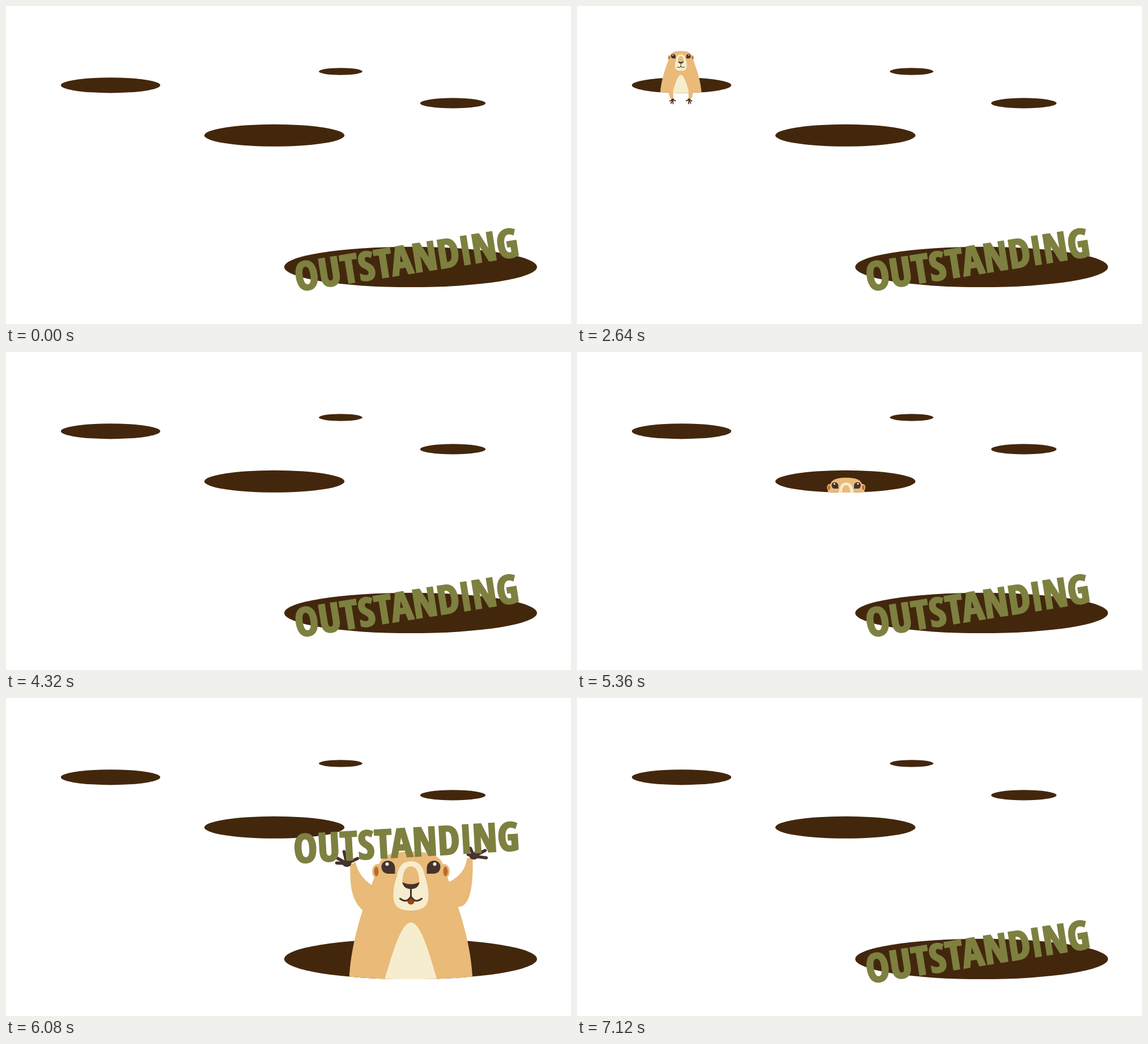
An HTML page with a canvas that plays this animation: 997x561 px, repeating every 7200 ms.

```html
<!DOCTYPE html>
<html lang="en">
<head>
<meta charset="utf-8">
<title>Outstanding</title>
<style>
  html, body { margin: 0; width: 100%; height: 100%; overflow: hidden; background: #fff; }
  canvas { display: block; }
</style>
</head>
<body>
<canvas id="stage" width="997" height="561"></canvas>
<script>
const ctx = document.getElementById('stage').getContext('2d');
const LOOP = 7200, STEP = 80, DEPTH = 225;
const SOIL = '#43270d', FUR = '#e9ba78', CREAM = '#f6edcf', DARK = '#46332e',
      EAR = '#bd6a2f', TONGUE = '#a5440f', OLIVE = '#7e8040';

// hole: cx, cy, rx, ry; up and down: start and end in ms
const gophers = [
  { hole: [590.5, 115.5, 38.5, 6.2], x: 590, top: 79, scale: .192, up: [40, 560], down: [1050, 1350], ease: 2 },
  { hole: [184.5, 139.8, 87.7, 13.6], x: 183.3, top: 79, scale: .335, up: [1640, 2160], down: [2638, 2938], ease: 2 },
  { hole: [788.5, 171.4, 57.6, 9.1], x: 788.5, top: 132, scale: .225, up: [3300, 3520], down: [3990, 4300], ease: 1 },
  { hole: [473.6, 228.3, 123.6, 19.5], x: 475, top: 138, scale: .494, up: [4660, 4880], down: [5115, 5440], ease: 1 },
  { hole: [714, 460.4, 223, 35.7], x: 714.5, top: 271, scale: 1, up: [5470, 6080], down: [6930, 7110], ease: 2, lifts: true },
];
const lifter = gophers[4];

const clamp = (v, lo, hi) => Math.max(lo, Math.min(hi, v));
const progress = (t, [a, b]) => clamp((t - a) / (b - a), 0, 1);

function dropAt(g, t) {
  const rise = 1 - (1 - progress(t, g.up)) ** g.ease;
  return DEPTH * (1 - rise + progress(t, g.down));
}

function ellipse(x, y, rx, ry, color) {
  ctx.fillStyle = color;
  ctx.beginPath();
  ctx.ellipse(x, y, rx, ry, 0, 0, Math.PI * 2);
  ctx.fill();
}

function shape(d, color) {
  ctx.fillStyle = color;
  ctx.fill(new Path2D(d));
}

function line(d, width) {
  ctx.strokeStyle = DARK;
  ctx.lineWidth = width;
  ctx.lineCap = ctx.lineJoin = 'round';
  ctx.stroke(new Path2D(d));
}

// Runs a drawing for the left side and again flipped for the right
function bothSides(draw) {
  for (const side of [1, -1]) {
    ctx.save();
    ctx.scale(side, 1);
    draw();
    ctx.restore();
  }
}

function hand(x, y, tips) {
  ellipse(x, y, 8, 6, DARK);
  for (const [dx, dy] of tips) line(`M${x} ${y}L${x + dx} ${y + dy}`, 5.5);
}

function raisedArms() {
  shape('M-107 24C-108 62 -104 88 -84 104L-60 92L-66 61C-84 50 -94 36 -98 18Z', FUR);
  shape('M109 12C110 58 106 97 83 98L60 90L64 55C84 46 97 32 99 11Z', FUR);
  hand(-113, 21, [[-18, -1], [-16, -9], [-5, -21], [6, -14], [19, -9]]);
  hand(111, 8, [[22, 3], [20, -10], [8, -14], [-6, -14], [-10, -3]]);
}

function hangingArms() {
  bothSides(() => {
    shape('M-70 212L-63 228Q-60 246 -51 258L-39 256Q-41 240 -40 212Z', FUR);
    hand(-43, 259, [[-15, 7], [-9, 19], [2, 21], [15, 6]]);
  });
}

function body() {
  bothSides(() => ellipse(-59, 35, 9.5, 13, FUR));
  shape('M-109 228C-107 170 -90 112 -67 52L-57 24C-51 4 -28 0 0 0S51 4 57 24L67 52C90 112 107 170 109 228Z', FUR);
  bothSides(() => ellipse(-61, 35, 4, 8.5, EAR));
  shape('M-47 228C-34 185 -18 125 0 125S34 185 47 228Z', CREAM);
}

function face(tongue) {
  shape('M0 17C14 17 21 26 24 40C27 52 31 62 31 78C31 97 20 104 0 104S-31 97 -31 78C-31 62 -27 52 -24 40C-21 26 -14 17 0 17Z', CREAM);
  shape('M-15 57C-15 40 -11 26 0 26S15 40 15 57L0 63Z', FUR);
  if (tongue) ellipse(0, 87, 6.5, 6.5, TONGUE);
  shape('M-15 54Q0 61 15 54Q13 66 0 66T-15 54Z', DARK);
  line('M0 64V79M-19 83Q-7 92 0 79Q7 92 19 83', 3);
  bothSides(() => {
    shape('M-28 39H-40C-47 39 -52 34 -52 27C-52 20 -47 16 -41 16C-33 16 -28 22 -28 29Z', DARK);
  });
  ellipse(-42, 22, 3, 3, '#fff');
  ellipse(42, 22, 3, 3, '#fff');
}

function drawGopher(g, t) {
  const drop = dropAt(g, t);
  if (drop >= DEPTH) return;
  const [cx, cy, rx, ry] = g.hole;

  ctx.save();
  ctx.beginPath();
  ctx.rect(cx - rx, 0, rx * 2, cy);
  ctx.ellipse(cx, cy, rx, ry, 0, 0, Math.PI * 2);
  ctx.clip();
  ctx.translate(g.x, g.top);
  ctx.scale(g.scale, g.scale);
  ctx.translate(0, drop);
  if (g.lifts) raisedArms();
  body();
  face(g.lifts);
  ctx.restore();

  // Paws reach over the rim as the body comes up
  if (!g.lifts && drop < 75) {
    ctx.save();
    ctx.translate(g.x, g.top);
    ctx.scale(g.scale, g.scale);
    ctx.translate(0, -drop);
    hangingArms();
    ctx.restore();
  }
}

function wordPose(t) {
  if (t >= 6240 && t < 6480) return { x: 706.5, y: 197, angle: -3.3 };
  if (t >= 6480 && t < 6560) return { x: 706, y: 226, angle: -3 };
  const drop = Math.min(dropAt(lifter, t), 192.5);
  const held = t >= 6560 ? -2.6 : -3.3;
  return { x: 706.5, y: 255 + drop, angle: held + (-9 - held) * drop / 192.5 };
}

function drawWord(t) {
  const word = 'OUTSTANDING', size = 69;
  const { x, y, angle } = wordPose(t);
  ctx.font = `800 condensed ${size}px "Open Sans Condensed", "Roboto Condensed", "Open Sans", "Noto Sans", sans-serif`;
  ctx.letterSpacing = '0px';
  const spacing = clamp((399 - ctx.measureText(word).width) / word.length, -3, 5);
  ctx.letterSpacing = spacing + 'px';

  ctx.save();
  ctx.translate(x, y);
  ctx.rotate(angle * Math.PI / 180);
  ctx.textAlign = 'center';
  ctx.fillStyle = ctx.strokeStyle = OLIVE;
  ctx.lineWidth = 3.2;
  ctx.lineJoin = 'miter';
  ctx.miterLimit = 3;
  ctx.fillText(word, spacing / 2, size * .357);
  ctx.strokeText(word, spacing / 2, size * .357);
  ctx.restore();
}

function frame(now) {
  const t = Math.floor(now % LOOP / STEP) * STEP;
  ctx.fillStyle = '#fff';
  ctx.fillRect(0, 0, 997, 561);
  for (const g of gophers) ellipse(...g.hole, SOIL);
  for (const g of gophers) drawGopher(g, t);
  drawWord(t);
  requestAnimationFrame(frame);
}
requestAnimationFrame(frame);
</script>
</body>
</html>
```
